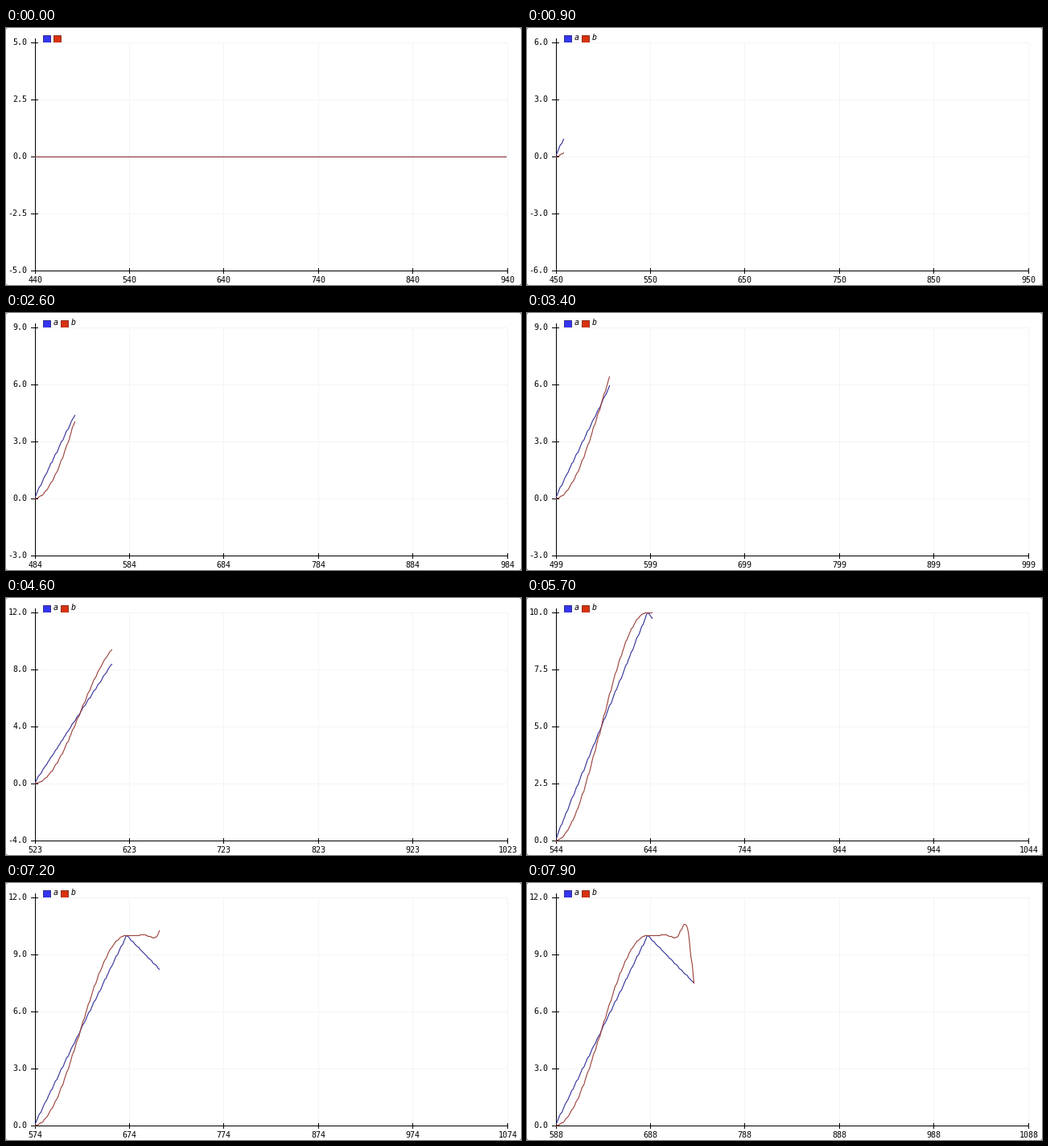
A matplotlib script that plays this animation: 640x320 px, repeating every 8 s.

```python
import math

import matplotlib.pyplot as plt
from matplotlib.animation import FuncAnimation
from matplotlib.patches import Polygon, Rectangle

WIDTH, HEIGHT, DPI = 640, 320, 80
LEFT, RIGHT, TOP, BOTTOM = 36, 623, 18, 302
FRAMES, INTERVAL = 80, 100
WINDOW = 500          # samples across the plot
RAMP = 98             # samples per ramp
PX = 72 / DPI         # one pixel in points
IDLE_FRAMES = 4
FIRST_SAMPLE = 441

GRID = "#f4f4f4"
BLUE, RED = "#3535f0", "#d83210"
BLUE_EDGE, RED_EDGE = "#30308c", "#8c3424"
BLUE_LINE, RED_LINE = "#36349a", "#9c443e"

fig = plt.figure(figsize=(WIDTH / DPI, HEIGHT / DPI), dpi=DPI, facecolor="white")
ax = fig.add_axes([0, 0, 1, 1])


def elastic_in_out(t):
    wave = math.sin((20 * t - 11.125) * 2 * math.pi / 4.5)
    if t < 0.5:
        return -(2 ** (20 * t - 10)) * wave / 2
    return 2 ** (10 - 20 * t) * wave / 2 + 1


def linear_ramp(i):
    p = (i + 1) / RAMP
    return round(10 * p if p <= 1 else 10 - 5 * (p - 1), 2)


def eased_ramp(i):
    p = (i + 1) / RAMP
    if p <= 1:
        return round(5 * (1 - math.cos(math.pi * p)), 2)
    return round(10 - 5 * elastic_in_out(p - 1), 2)


def nice_range(low, high):
    """Round the range outwards to at most four equal steps."""
    if high - low < 10:
        middle = (low + high) / 2
        low, high = middle - 5, middle + 5
    for step in (2.5, 3, 4, 5):
        first, last = math.floor(low / step), math.ceil(high / step)
        if last - first <= 4:
            break
    return first * step, step, last - first


def line(x0, y0, x1, y1, color):
    """Fill the pixels from (x0, y0) to (x1, y1), both included."""
    ax.plot([x0 + 0.5, x1 + 0.5], [y0 + 0.5, y1 + 0.5], color=color,
            lw=PX, solid_capstyle="projecting", snap=False)


def label(x, baseline, text, align, style="normal"):
    ax.text(x, baseline, text, ha=align, va="baseline", color="black",
            fontsize=10 * PX, family="DejaVu Sans Mono", style=style)


def draw_axes(start, low, step, count):
    y_ticks = [round(BOTTOM - j * (BOTTOM - TOP) / count) for j in range(count + 1)]
    columns = count + 1
    x_ticks = [int(LEFT + j * (RIGHT - LEFT) / columns) for j in range(columns + 1)]
    for y in y_ticks[1:]:
        line(LEFT, y, RIGHT, y, GRID)
    for x in x_ticks[1:]:
        line(x, TOP, x, BOTTOM, GRID)

    line(LEFT, 13, LEFT, BOTTOM, "black")
    line(LEFT, BOTTOM, RIGHT, BOTTOM, "black")
    for j, y in enumerate(y_ticks):
        line(LEFT - 5, y, LEFT + 3, y, "black")
        label(26.5, y + 3, f"{low + j * step:.1f}", "right")
    for j, x in enumerate(x_ticks):
        line(x, BOTTOM - 3, x, BOTTOM + 3, "black")
        label(x + 0.5, 317, str(start + j * WINDOW // columns), "center")


def draw_legend(names):
    x = 46
    for name, face, edge in zip(names, (BLUE, RED), (BLUE_EDGE, RED_EDGE)):
        ax.add_patch(Rectangle((x + 0.5, 9.5), 9, 9, facecolor=face,
                               edgecolor=edge, lw=PX, snap=False))
        if name:
            label(x + 13, 15, name, "left", "italic")
        x += 22 if name else 13


def draw_corners():
    for x, dx in ((0, 2), (WIDTH, -2)):
        for y, dy in ((0, 2), (HEIGHT, -2)):
            ax.add_patch(Polygon([(x, y), (x + dx, y), (x, y + dy)],
                                 facecolor="#a0a0a0", lw=0))


def draw_series(values, color, low, span):
    xs = [LEFT + int(i * (RIGHT - LEFT) / WINDOW) + 0.5 for i in range(len(values))]
    ys = [int(BOTTOM - (v - low) / span * (BOTTOM - TOP)) + 0.5 for v in values]
    ax.plot(xs, ys, color=color, lw=1.15 * PX, solid_joinstyle="round", snap=False)


def draw(frame):
    ax.clear()
    ax.set_xlim(0, WIDTH)
    ax.set_ylim(HEIGHT, 0)
    ax.axis("off")

    if frame < IDLE_FRAMES:
        start, names = 440, ("", "")
        a = b = [0] * WINDOW
    else:
        start, names = int(433.2 + 1.96 * frame), ("a", "b")
        samples = range(start - FIRST_SAMPLE)
        a = [linear_ramp(i) for i in samples]
        b = [eased_ramp(i) for i in samples]

    low, step, count = nice_range(min(a + b, default=0), max(a + b, default=0))
    draw_axes(start, low, step, count)
    draw_legend(names)
    draw_series(a, BLUE_LINE, low, step * count)
    draw_series(b, RED_LINE, low, step * count)
    draw_corners()
    return []


animation = FuncAnimation(fig, draw, frames=FRAMES, interval=INTERVAL,
                          init_func=lambda: [], repeat=True, repeat_delay=0)
plt.show()
```
